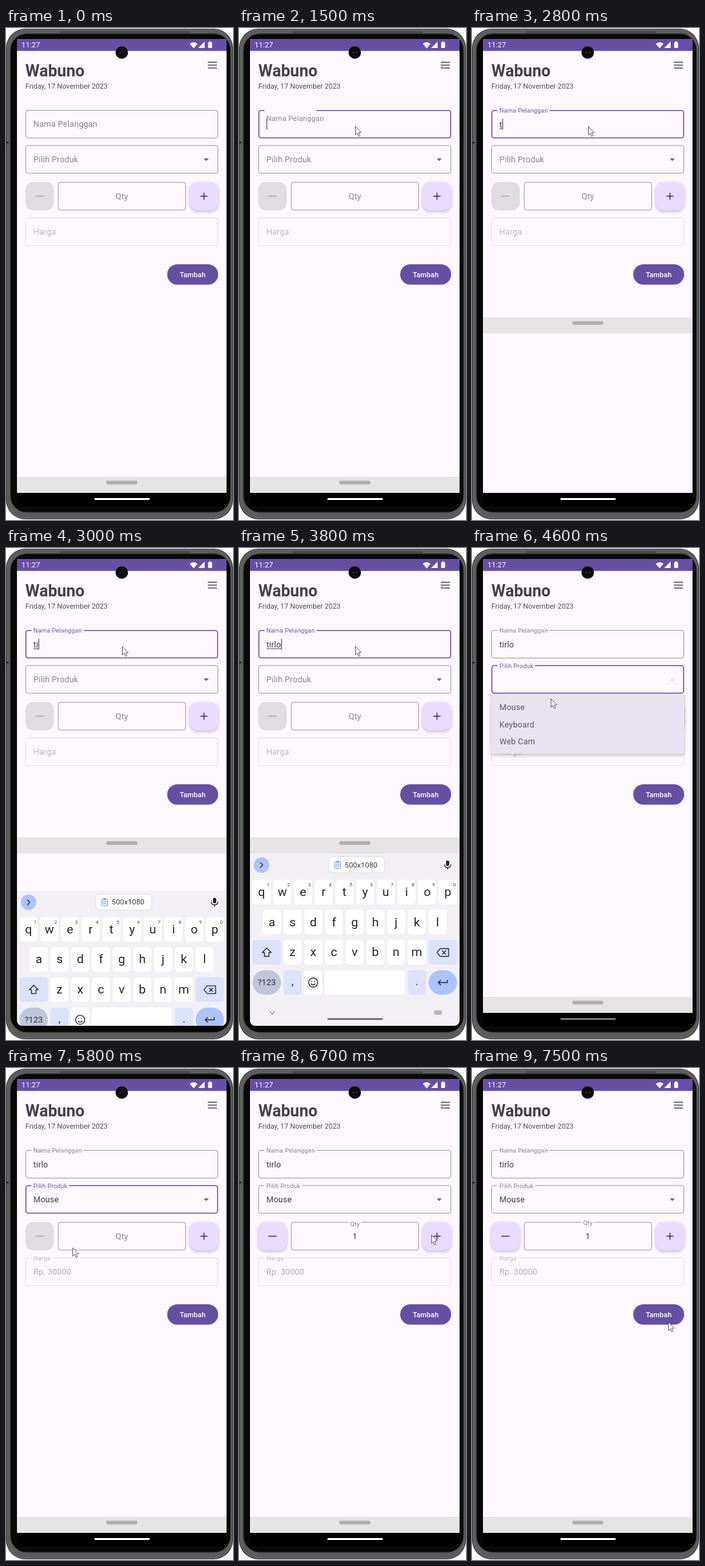
An HTML page with a canvas for the animation above (8000 ms loop, 352 by 762 pixels).

```html
<!DOCTYPE html>
<html lang="id">
<head>
<meta charset="utf-8">
<title>Shop form</title>
<style>
  html, body { margin: 0; width: 100%; height: 100%; overflow: hidden; background: #fff; }
  canvas { display: block; }
</style>
</head>
<body>
<canvas id="stage" width="352" height="762"></canvas>
<script>
const ctx = document.getElementById('stage').getContext('2d');
const LOOP = 8000, STEP = 100;
const PURPLE = '#6c57a8', PAPER = '#fdf7fe', GRAY = '#88838d', INK = '#444049';
const CUSTOMER = 'tirlo';
const KEY_TIMES = [2800, 2900, 3100, 3200, 3400];

// Pointer stops: time, x, y
const POINTER = [
  [1300, 180, 152], [3800, 180, 152], [4200, 140, 200], [4400, 130, 212],
  [4600, 122, 233], [4900, 112, 242], [5400, 112, 242], [5800, 103, 278],
  [6200, 318, 266], [6400, 298, 258], [6800, 298, 258], [7400, 305, 392], [7500, 304, 393]
];

const clamp = v => Math.min(1, Math.max(0, v));
const lerp = (a, b, p) => a + (b - a) * p;
const progress = (t, from, to) => clamp((t - from) / (to - from));
const easeOut = p => 1 - (1 - p) ** 3;
const between = (t, from, to) => t >= from && t < to;

function box(x, y, w, h, r, fill, stroke, line = 1) {
  ctx.beginPath();
  ctx.roundRect(x, y, w, h, r);
  if (fill) { ctx.fillStyle = fill; ctx.fill(); }
  if (stroke) { ctx.strokeStyle = stroke; ctx.lineWidth = line; ctx.stroke(); }
}

function text(str, x, y, size, color, { align = 'left', weight = 400, spacing = 0 } = {}) {
  ctx.font = `${weight} ${size}px Roboto, sans-serif`;
  ctx.letterSpacing = spacing + 'px';
  ctx.textAlign = align;
  ctx.textBaseline = 'middle';
  ctx.fillStyle = color;
  ctx.fillText(str, x, y);
  return ctx.measureText(str).width;
}

function icon(d, x, y, { fill, stroke, line = 1.4 }) {
  const path = new Path2D(d);
  ctx.save();
  ctx.translate(x, y);
  if (fill) { ctx.fillStyle = fill; ctx.fill(path); }
  if (stroke) { ctx.strokeStyle = stroke; ctx.lineWidth = line; ctx.stroke(path); }
  ctx.restore();
}

function withShadow(blur, dy, color, draw) {
  ctx.save();
  ctx.shadowBlur = blur;
  ctx.shadowOffsetY = dy;
  ctx.shadowColor = color;
  draw();
  ctx.restore();
}

function phone() {
  ctx.fillStyle = '#fff';
  ctx.fillRect(0, 0, 352, 762);
  box(0, 1, 352, 760, 30, '#4a4a4a');
  box(2.5, 3, 347, 756, 28, '#5c5c5c', '#6c6c6c');
  box(83, 5, 202, 3, 1, '#484848');
  box(7, 9, 341, 741, 25, '#080808', '#2a2a2a');
  box(0, 176, 4, 3, 1, '#2c2c2c');
}

function header() {
  ctx.fillStyle = PAPER;
  ctx.fillRect(17, 17, 325, 703);
  ctx.fillStyle = '#000';
  ctx.fillRect(17, 720, 325, 21);
  ctx.fillStyle = '#664fa3';
  ctx.fillRect(17, 17, 325, 18.5);
  text('11:27', 24, 27, 11.6, '#fff');
  icon('M-6-2Q0-7 6-2L0 5Z', 291, 26.5, { fill: '#fff' });
  icon('M5-5V5H-5Z', 303, 26, { fill: '#fff' });
  box(313.5, 22, 6, 9, 1, '#fff');
  box(315, 20.8, 3, 2, 0, '#fff');
  ctx.beginPath();
  ctx.arc(179.5, 38, 9.7, 0, 7);
  ctx.fillStyle = '#0b0b0d';
  ctx.fill();
  box(176, 37, 2, 2, 1, '#44444a');
  box(181, 37, 2, 2, 1, '#44444a');
  icon('M-7-4.5H7M-7 0H7M-7 4.5H7', 320, 57.5, { stroke: '#524e57', line: 1.3 });
  text('Wabuno', 30, 68, 25.2, INK, { weight: 700 });
  text('Friday, 17 November 2023', 30, 90.5, 11.05, '#524e57');
}

// Outlined text field whose label floats into a gap in the border
function field({ x = 30, y, w = 299, label, value, float = 0, focus, disabled, center }) {
  const h = 44, mid = y + h / 2 + .5;
  const textX = center ? x + w / 2 : x + 12.5;
  const align = center ? 'center' : 'left';
  const border = focus ? PURPLE : disabled ? '#e4dfe6' : '#9d97a0';
  const line = focus ? 1.6 : 1;
  box(x + line / 2, y + line / 2, w - line, h - line, 3.5, null, border, line);
  if (float > 0) {
    ctx.font = '400 9.48px Roboto, sans-serif';
    ctx.letterSpacing = '0.24px';
    const gap = ctx.measureText(label).width + 5;
    ctx.fillStyle = PAPER;
    ctx.fillRect(center ? textX - gap / 2 : textX - 3, y - 2, gap, 5);
  }
  const labelColor = disabled ? '#bcb6bf' : focus && float === 1 ? PURPLE : GRAY;
  text(label, textX, lerp(mid, y + 1.5, float), lerp(12.64, 9.48, float), labelColor,
    { align, spacing: .2 });
  if (!value) return textX;
  return textX + text(value, textX, mid + .5, 12.64, disabled ? '#b0aab3' : '#3c3842',
    { align, spacing: .2 });
}

function arrow(t) {
  const open = between(t, 4600, 5500);
  const faded = between(t, 4500, 4700) || between(t, 5400, 5600);
  ctx.globalAlpha = faded ? .15 : 1;
  const color = between(t, 4400, 6600) ? PURPLE : '#6a656f';
  icon(open ? 'M-4 2L0-2L4 2Z' : 'M-4-2L0 2L4-2Z', 310.5, 204, { fill: color });
  ctx.globalAlpha = 1;
}

function stepButton(x, sign, enabled) {
  const draw = () => box(x, 238.5, 44, 44, 12, enabled ? '#e8ddff' : '#e1dce1');
  if (enabled) withShadow(5, 2, 'rgba(60,40,90,.3)', draw); else draw();
  icon(sign === '+' ? 'M-5.5 0H5.5M0-5.5V5.5' : 'M-6.5 0H6.5', x + 22, 260.5,
    { stroke: enabled ? '#3a2b60' : '#aca7ad', line: 1.4 });
}

function form(t) {
  const typed = CUSTOMER.slice(0, KEY_TIMES.filter(k => t >= k).length);
  const naming = between(t, 1500, 4400);
  const end = field({
    y: 127, label: 'Nama Pelanggan', value: typed, focus: naming,
    float: clamp(t < 1500 ? 0 : .42 + (t - 1500) / 180)
  });
  if (naming) {
    if (typed && t < 4200) box(42.5, 155.5, end - 42.5, 1, 0, '#46424c');
    if (!between(t, 1800, 2300)) box(end, 140.5, 1.4, 17, 0, PURPLE);
  }
  field({
    y: 181.5, label: 'Pilih Produk', value: t >= 5400 && 'Mouse',
    focus: between(t, 4400, 6600), float: progress(t, 4350, 4600)
  });
  arrow(t);
  const counted = t >= 6600;
  stepButton(30, '-', counted);
  field({
    x: 80.5, y: 238.5, w: 198.5, label: 'Qty', center: true,
    value: counted && '1', float: progress(t, 6520, 6720)
  });
  stepButton(285, '+', true);
  field({
    y: 293.5, label: 'Harga', value: t >= 5400 && 'Rp. 30000',
    disabled: true, float: progress(t, 5320, 5520)
  });
  box(250, 366, 79, 31.5, 15.75, '#654fa2');
  text('Tambah', 289.5, 382.5, 11.05, '#fff', { align: 'center', weight: 500, spacing: .08 });
}

function menu(t) {
  const alpha = Math.min(progress(t, 4300, 4600), 1 - progress(t, 5300, 5600));
  if (!alpha) return;
  ctx.globalAlpha = alpha;
  withShadow(5, 2, 'rgba(0,0,0,.25)', () => box(30, 226, 299, 93, [0, 0, 3, 3], '#e9e3f1'));
  ['Mouse', 'Keyboard', 'Web Cam'].forEach((item, i) =>
    text(item, 42.5, 247 + i * 26.8, 12.64, '#5a5662', { spacing: .2 }));
  ctx.globalAlpha = 1;
}

function sheet(t) {
  const y = between(t, 2800, 4300) ? 448 : 695;
  ctx.fillStyle = '#e6e4e5';
  ctx.fillRect(17, y, 325, 25);
  withShadow(2, 0, 'rgba(0,0,0,.15)', () => box(155.5, y + 6.5, 48, 5, 2, '#adacae'));
}

function keyRow(letters, x, y, numbered) {
  [...letters].forEach((letter, i) => {
    const cx = x + i * 32.1;
    box(cx - 14, y, 28, 38, 5, '#fff');
    text(letter, cx, y + 19.5, 19, '#23242a', { align: 'center' });
    if (numbered) text((i + 1) % 10, cx + 10, y + 7.5, 8, '#4a4b52', { align: 'center' });
  });
}

function keyboard(t) {
  const shown = t < 4200 ? easeOut(progress(t, 2800, 3300)) : 1 - progress(t, 4200, 4500) ** 2;
  if (!shown) return;
  const PALE = '#dce2f9', BLUE = '#adc3fb', DARK = '#2b2d36';
  ctx.save();
  ctx.beginPath();
  ctx.roundRect(17, 473, 325, 267, [0, 0, 8, 8]);
  ctx.clip();
  ctx.translate(0, 267 * (1 - shown));
  ctx.fillStyle = '#f2f0f5';
  ctx.fillRect(17, 473, 325, 267);

  box(23, 479, 24, 24, 12, BLUE);
  icon('M-2-4L2 0L-2 4', 35, 491, { stroke: DARK });
  box(139, 478.5, 87, 24.5, 6, '#fff', '#dedce4');
  box(148.5, 486, 9, 10.5, 1, '#eaf0ff', '#7d9fe8');
  box(151, 484.5, 4, 3, 1, '#7d9fe8');
  icon('M-3 0H3M-3 3H2', 153, 490, { stroke: '#7d9fe8', line: 1 });
  text('500x1080', 164, 491.5, 11.1, '#33343a', { spacing: .2 });
  box(321, 484, 5, 8.5, 2.5, '#222');
  icon('M-5-1Q-5 4 0 4Q5 4 5-1M0 4V7', 323.5, 491, { stroke: '#222', line: 1.3 });

  keyRow('qwertyuiop', 35, 514, true);
  keyRow('asdfghjkl', 51, 560.5);
  keyRow('zxcvbnm', 83, 607);

  box(21, 607, 44, 38, 5, PALE);
  icon('M0-7L7 0H3.5V6H-3.5V0H-7Z', 43, 626.5, { stroke: DARK });
  box(294, 607, 44, 38, 5, PALE);
  icon('M-9 0L-4-6H9V6H-4ZM-1-3L5 3M5-3L-1 3', 316, 626.5, { stroke: DARK });

  box(21, 654, 44, 38, 19, '#bfc5dc');
  text('?123', 43, 673.5, 13, DARK, { align: 'center' });
  box(69, 654, 28, 38, 5, PALE);
  text(',', 83, 672, 17, DARK, { align: 'center' });
  box(101, 654, 28, 38, 5, '#fff');
  icon('M7 0A7 7 0 1 1-7 0A7 7 0 1 1 7 0M-3.5 1.5Q0 6 3.5 1.5M-3-2H-1.5M1.5-2H3',
    115, 673, { stroke: DARK });
  box(133, 654, 124, 38, 5, '#fff');
  box(262, 654, 28, 38, 5, PALE);
  text('.', 276, 672, 17, DARK, { align: 'center' });
  box(294, 654, 44, 38, 19, BLUE);
  icon('M7-4V0H-7M-3-4L-7 0L-3 4', 316, 673, { stroke: DARK, line: 1.5 });

  icon('M-4-2L0 2L4-2', 51.5, 720, { stroke: '#8f8e96', line: 1.2 });
  box(302, 716, 13, 7, 1, '#cbc9d0');
  icon('M-5-2H5M-5 0H5M-3 2H3', 308.5, 719.5, { stroke: '#8f8e96', line: .8 });
  ctx.restore();
}

function pointer(t) {
  if (t < POINTER[0][0]) return;
  const i = POINTER.findLastIndex(p => t >= p[0]);
  const a = POINTER[i], b = POINTER[i + 1] || a;
  const p = a === b ? 0 : progress(t, a[0], b[0]);
  ctx.lineJoin = 'round';
  icon('M.5.5V13.5L3.4 10.8L5.4 15.6L7.6 14.7L5.6 10H9.5Z',
    lerp(a[1], b[1], p), lerp(a[2], b[2], p), { fill: '#fff', stroke: '#4a4a4e', line: .9 });
}

function draw(t) {
  phone();
  header();
  form(t);
  sheet(t);
  menu(t);
  keyboard(t);
  box(137, 728, 86, 3, 1.5, between(t, 3600, 5200) ? '#77757a' : '#fff');
  pointer(t);
}

const start = performance.now();
function tick() {
  const t = (performance.now() - start) % LOOP;
  draw(Math.floor(t / STEP) * STEP);
  requestAnimationFrame(tick);
}
tick();
</script>
</body>
</html>
```
